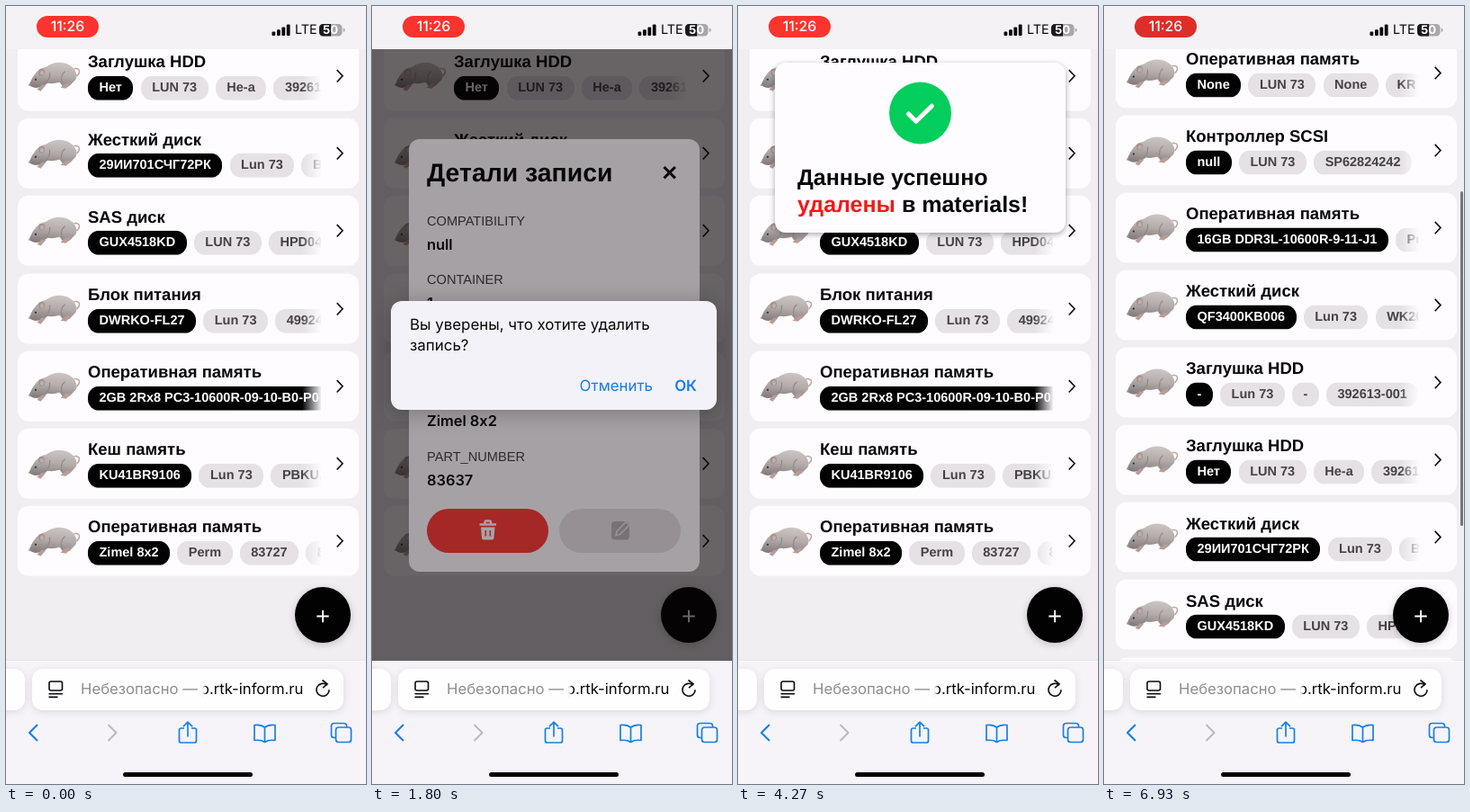
Animation, 400 px wide and 865 px high, one loop 7 s. Source, as an HTML page:

```html
<!DOCTYPE html>
<html lang="ru">
<head>
<meta charset="utf-8">
<title>Список материалов</title>
<style>
  html, body { margin: 0; width: 400px; height: 865px; overflow: hidden; background: #f1eef1; }
  body { position: relative; font-family: "Liberation Sans", Arial, sans-serif; color: #070708;
         text-rendering: geometricPrecision; }
  .box, .line { position: absolute; box-sizing: border-box; }
  .line { white-space: nowrap; line-height: 24px; margin-top: -12px; }
  .bold { font-weight: 700; }
  .ui { font-family: Inter, sans-serif; font-size: 16.7px; }
  svg { position: absolute; left: 0; top: 0; overflow: visible; }

  #page { left: 0; top: 0; width: 400px; height: 865px; }
  .card { position: absolute; left: 12.5px; width: 379px; height: 78px; border-radius: 12px; background: #fefcff; }
  .card .name { position: absolute; left: 16.5px; top: 11.3px; line-height: 24px; font-size: 18.5px;
                font-weight: 700; white-space: nowrap; }
  .tags { position: absolute; left: 16.5px; right: 41.5px; top: 39px; height: 27px; overflow: hidden;
          display: flex; gap: 8.2px; }
  .tag { flex: none; padding: 0 12.5px; border-radius: 12.5px; background: #e5e1e5; color: #454246;
         font: 700 14.5px/27px "Liberation Sans", Arial, sans-serif; white-space: nowrap; }
  .tag:first-child { background: #020203; color: #fff; }
  .card svg, .fade { display: none; }
  .fade { position: absolute; left: 316px; top: 38px; width: 22px; height: 29px;
          background: linear-gradient(90deg, #fefcff00, #fefcff); }
  .loaded .card svg, .loaded .fade { display: block; }
  .loaded .name, .loaded .tags { left: 78.5px; }

  .soft { background: #e5e1e5; border-radius: 12px; }
  #fab { left: 321px; top: 645.5px; width: 62px; height: 62px; border-radius: 50%; background: #020203;
         box-shadow: 0 2px 8px #0003; }
  #bar { left: 396px; width: 3px; height: 372px; border-radius: 2px; background: #777579; }
  .veil { position: absolute; left: 0; top: 48px; width: 400px; height: 680px; }
  #modal { background: #00000063; }
  #dim { background: #0e060a; }
  .panel { position: absolute; left: 40.5px; width: 323px; border-radius: 12px; background: #fefcff; }
  .button { position: absolute; top: 411px; width: 135px; height: 49px; border-radius: 25px; }
  #alert { left: 21px; top: 327.5px; width: 362px; height: 121px; border-radius: 12px; background: #f3f2f8;
           box-shadow: 0 3px 24px #0004; font-size: 16.9px; }
  #alert .blue { color: #147cec; }
  #toast { top: 63px; height: 188.5px; box-shadow: 0 2px 6px #0005; font-size: 25px; }

  #status { left: 0; top: 0; width: 400px; height: 48px; background: #f4f2f5; }
  #clock { left: 34px; top: 11px; width: 69px; height: 23.5px; border-radius: 12px; color: #fff;
           text-align: center; line-height: 23.5px; font-size: 15.8px; font-weight: 500; }
  #tools { left: 0; top: 728px; width: 400px; height: 137px; background: #f6f4f8; border-top: 1px solid #fcfbfd;
           box-shadow: 0 -1px 1px #00000008; overflow: hidden; }
  .field { position: absolute; top: 7.5px; height: 46px; border-radius: 12px; background: #fefdff;
           box-shadow: 0 2px 10px #0000001c; }
  #host { left: 218px; width: 112.5px; display: flex; justify-content: flex-end; overflow: hidden;
          -webkit-mask: linear-gradient(90deg, #0000, #000 5px); mask: linear-gradient(90deg, #0000, #000 5px); }
  #progress { left: 34px; top: 50.5px; height: 2.6px; border-radius: 2px; background: #1680ee; }
</style>
</head>
<body>
<svg width="0" height="0">
  <defs>
    <linearGradient id="fur" x1=".6" y1="0" x2=".4" y2="1">
      <stop offset="0" stop-color="#cbc5c4"/><stop offset=".5" stop-color="#b3acab"/><stop offset="1" stop-color="#857d7d"/>
    </linearGradient>
    <symbol id="rat" viewBox="0 0 58 38" overflow="visible">
      <path d="M51 11Q57 10 57 14Q57 17 54 19" fill="none" stroke="#c0a5a1" stroke-width="1.5"/>
      <path d="M1 29Q4 21 9 15Q14 10 20 9Q27 4 35 4Q44 4 50 10Q56 17 53 23L46 30L39 31L35 26Q28 28 22 27L16 31Q6 34 1 29Z" fill="url(#fur)"/>
      <path d="M15 29L10 34L14 36L20 29ZM42 27L36 32L42 33L49 27Z" fill="#b89c98"/>
      <path d="M19 27Q25 23 24 15M38 27Q35 19 41 14" fill="none" stroke="#918989" stroke-width="1.2"/>
      <ellipse cx="15" cy="15" rx="3.6" ry="4" fill="#a39494"/>
      <ellipse cx="15.5" cy="15.4" rx="2" ry="2.5" fill="#c6adab"/>
      <circle cx="8.5" cy="23" r="1.1" fill="#332d2e"/>
      <circle cx="1.6" cy="29" r="1.1" fill="#bd9692"/>
    </symbol>
  </defs>
</svg>

<div id="page" class="box">
  <div id="scroll" class="box" style="width:400px">
    <div class="line bold" style="left:16px;width:400px;top:76px;text-align:center;font-size:24.6px">РОмК</div>
    <div class="line bold" style="left:12.5px;top:140px;font-size:24.6px">Список материалов</div>
    <div class="box soft" style="left:291px;top:123.5px;width:100.5px;height:35px"></div>
    <div class="line ui bold" style="left:338px;top:141px;font-size:14.6px">Дата</div>
    <div class="box soft" style="left:12.5px;top:166.5px;width:379px;height:41px"></div>
    <div class="line ui" style="left:58px;top:187px;font-size:16.4px;color:#a19ea2">Найти</div>
  </div>
  <div id="fab" class="box"><svg width="62" height="62"><path d="M24.3 32.5h13.4M31 25.8v13.4" stroke="#fff" stroke-width="2"/></svg></div>
  <div id="bar" class="box"></div>
</div>

<div id="modal" class="veil">
  <div id="details" class="panel" style="top:100px;height:480.5px">
    <div class="line bold" style="left:20.5px;top:37.5px;font-size:28.4px">Детали записи</div>
    <svg width="323" height="480"><path d="M283.5 31l12.4 12.4m0-12.4l-12.4 12.4" stroke="#070708" stroke-width="3"/></svg>
    <div class="button" style="left:20.5px;background:#fd3b38"></div>
    <div class="button" style="left:167.5px;background:#e5e1e5"></div>
    <svg width="323" height="480">
      <path d="M78.5 428.5h18.5M84.5 428v-2.5q0-1 1-1h4.5q1 0 1 1v2.5" fill="none" stroke="#fff" stroke-width="2.4"/>
      <path d="M80 431.5h15.5l-1 12q-.2 2-2 2h-9.5q-1.8 0-2-2z" fill="#fff"/>
      <path d="M85.3 435v6.5m5-6.5v6.5" stroke="#fd3b38" stroke-width="1.6"/>
      <rect x="225" y="425" width="20" height="20.5" rx="4" fill="#b4b1b5"/>
      <path d="M230 440.5l1-4.5l10.5-10.5l3.5 3.5l-10.5 10.5z" fill="#b4b1b5" stroke="#e5e1e5" stroke-width="1.7"/>
    </svg>
  </div>
</div>
<div id="dim" class="veil"></div>
<div id="alert" class="box ui">
  <div class="line" style="left:21px;top:27px">Вы уверены, что хотите удалить</div>
  <div class="line" style="left:21px;top:50px">запись?</div>
  <div class="line blue" style="right:71px;top:95px">Отменить</div>
  <div id="ok" class="line blue" style="right:22px;top:95px;font-weight:600">ОК</div>
</div>
<div id="toast" class="panel bold">
  <svg width="323" height="188"><circle cx="161.5" cy="56" r="34.5" fill="#03ce5c"/>
    <path d="M148.5 57l8.3 8.2l17.5-17" fill="none" stroke="#fff" stroke-width="5" stroke-linecap="round" stroke-linejoin="round"/></svg>
  <div class="line" style="left:25.5px;top:128px">Данные успешно</div>
  <div class="line" style="left:25.5px;top:158px"><span style="color:#f6171b">удалены</span> в materials!</div>
</div>

<div id="status" class="box ui">
  <div id="clock" class="box">11:26</div>
  <svg width="400" height="48">
    <g fill="#0a090b">
      <rect x="295.5" y="28.5" width="3.8" height="4.5" rx="1"/><rect x="301" y="26.3" width="3.8" height="6.7" rx="1"/>
      <rect x="306.4" y="23.6" width="3.8" height="9.4" rx="1"/><rect x="311.8" y="20.5" width="3.8" height="12.5" rx="1"/>
    </g>
    <rect x="348" y="20" width="25.5" height="13.5" rx="4.2" fill="#aaa7ab"/>
    <path d="M361 20h-8.8a4.2 4.2 0 0 0-4.2 4.2v5.1a4.2 4.2 0 0 0 4.2 4.2h8.800z" fill="#1a191b"/>
    <path d="M374.7 24.5q2 .6 2 2.300t-2 2.300z" fill="#aaa7ab"/>
  </svg>
  <div class="line" style="left:321px;top:27px;font-size:14.4px">LTE</div>
  <div class="line bold" style="left:352px;top:27px;font-size:13.2px;color:#fff">50</div>
</div>

<div id="tools" class="box ui">
  <div class="field" style="left:-20px;width:40.5px"></div>
  <div class="field" style="left:29px;width:346px"></div>
  <div id="idle">
    <div class="line" style="left:83px;top:31px;color:#8f8c91">Небезопасно —</div>
    <div id="host" class="line" style="top:31px"><span>suip.rtk-inform.ru</span></div>
    <svg width="400" height="137" fill="none" stroke="#0a090b" stroke-width="1.6">
      <path d="M356.8 26.2a7 7 0 1 0 2.2 5"/><path d="M351.5 20.5l5.5 4.3l-5 4.4"/>
    </svg>
  </div>
  <div id="busy">
    <div class="line" style="left:2px;width:400px;top:31px;text-align:center">suip.rtk-inform.ru</div>
    <svg width="400" height="137"><path d="M346 24.5l12.5 12.5m0-12.5l-12.5 12.5" stroke="#0a090b" stroke-width="1.7"/></svg>
    <div id="progress" class="box"></div>
  </div>
  <svg width="400" height="137" fill="none" stroke="#1a7ee6" stroke-width="1.7" stroke-linejoin="round">
    <g stroke="#0a090b" stroke-width="1.6"><rect x="48" y="22" width="14.5" height="10" rx="2"/><path d="M47.5 35.7h15.5M47.5 39.4h10"/></g>
    <path d="M35 70l-9 9l9 9" stroke-width="2.1"/>
    <path d="M113.5 70l9 9l-9 9" stroke="#bcb9bf" stroke-width="2.1"/>
    <path d="M198 74h-3.5q-2 0-2 2v12q0 2 2 2h15q2 0 2-2v-12q0-2-2-2h-3.5M202 83.5v-16m-5 4.7l5-5l5 5"/>
    <path d="M287.5 73q-4-3.5-11.5-2.5v17q7.5-1 11.5 2q4-3 11.5-2v-17q-7.5-1-11.5 2.5zv16"/>
    <path d="M366 84.5h-1.5q-3 0-3-3v-10q0-3 3-3h11q3 0 3 3v1.5"/><rect x="366.5" y="73" width="17" height="16.5" rx="3"/>
  </svg>
  <div class="box" style="left:130px;top:123px;width:144px;height:5px;border-radius:3px;background:#020203"></div>
</div>

<script>
const $ = id => document.getElementById(id);
const LOOP = 7000, PITCH = 86.1, FIRST = 223.5;
const FULL_END = 787.2, SHORT_END = 701.1, FINAL = 360.4;
const RELOAD = 5195, RESTORED = 5460;
const DISK = 'Жесткий диск', RAM = 'Оперативная память', BLANK = 'Заглушка HDD';

const items = [
  [DISK, 'None', 'LUN 73', 'None', '652625-001'],
  [DISK, 'None', 'LUN 73', 'None', '827486-001'],
  [RAM, 'None', 'LUN 73', 'None', 'KR M395T2953'],
  ['Контроллер SCSI', 'null', 'LUN 73', 'SP62824242', '719240-001'],
  [RAM, '16GB DDR3L-10600R-9-11-J1', 'Prom 84', '84'],
  [DISK, 'QF3400KB006', 'Lun 73', 'WK20FN32', '73'],
  [BLANK, '-', 'Lun 73', '-', '392613-001'],
  [BLANK, 'Нет', 'LUN 73', 'Не-а', '392613-001'],
  [DISK, '29ИИ701СЧГ72РК', 'Lun 73', 'B365'],
  ['SAS диск', 'GUX4518KD', 'LUN 73', 'HPD04'],
  ['Блок питания', 'DWRKO-FL27', 'Lun 73', '499249-001'],
  [RAM, '2GB 2Rx8 PC3-10600R-09-10-B0-P0'],
  ['Кеш память', 'KU41BR9106', 'Lun 73', 'PBKUA'],
  [RAM, 'Zimel 8x2', 'Perm', '83727', '83637'],
];

const cards = items.map(([name, ...tags], i) => {
  const card = document.createElement('div');
  card.className = 'card';
  card.style.top = FIRST + i * PITCH + 'px';
  card.innerHTML = `
    <svg width="379" height="78"><use href="#rat" x="11.5" y="20" width="58" height="38"/>
      <path d="M354.7 32.3l6.3 6.7l-6.3 6.7" fill="none" stroke="#070708" stroke-width="1.6"/></svg>
    <div class="name">${name}</div>
    <div class="tags">${tags.map(s => `<span class="tag">${s}</span>`).join('')}</div>
    <div class="fade"></div>`;
  return $('scroll').appendChild(card);
});

[['COMPATIBILITY', 'null'], ['CONTAINER', '1'], ['ID', '42'], ['NAME', 'Zimel 8x2'], ['PART_NUMBER', '83637']]
  .forEach(([label, value], i) => {
    const y = 91.5 + i * 65.5;
    $('details').insertAdjacentHTML('beforeend', `
      <div class="line" style="left:20.5px;top:${y}px;font-size:14.6px;color:#403d41">${label}</div>
      <div class="line ui" style="left:20.5px;top:${y + 25}px;font-size:16.4px;font-weight:600">${value}</div>`);
  });

const ramp = (t, a, b) => Math.min(1, Math.max(0, (t - a) / (b - a)));
const show = (id, on) => { $(id).style.display = on ? '' : 'none'; };
const fade = (id, v) => { show(id, v > 0); $(id).style.opacity = v; };

function scrollAt(t) {
  if (t < RELOAD) return FULL_END;
  if (t < RESTORED) return 0;
  return SHORT_END + (FINAL - SHORT_END) * ramp(t, 6640, 6930) ** 1.4;
}

function render(t) {
  const scroll = scrollAt(t);
  $('scroll').style.transform = `translateY(${-scroll}px)`;
  $('page').classList.toggle('loaded', t < RELOAD || t >= RESTORED);
  cards[13].style.display = t < RELOAD ? '' : 'none';
  show('bar', t > 6650);
  $('bar').style.top = 48 + 308 * scroll / SHORT_END + 'px';

  fade('modal', t < 2925 ? ramp(t, 330, 460) : 0);
  const alert = ramp(t, 1400, 1560) - ramp(t, 2770, 2900);
  fade('dim', alert * 0.37);
  fade('alert', alert);
  $('ok').style.opacity = 1 - 0.82 * ramp(t, 2640, 2710);
  show('toast', t >= 2995 && t < RELOAD);

  const busy = t >= RELOAD && t < 5600;
  show('idle', !busy);
  show('busy', busy);
  $('progress').style.width = 30 + 306 * ramp(t, 5200, 5560) + 'px';

  const glow = 0.5 + 0.5 * Math.cos(t / 2067 * 2 * Math.PI);
  $('clock').style.background = `rgb(${214 + 41 * glow}, ${45 + 7 * glow}, ${41 + 5 * glow})`;
}

const start = performance.now();
function tick() {
  render((performance.now() - start) % LOOP);
  requestAnimationFrame(tick);
}
tick();
</script>
</body>
</html>
```
